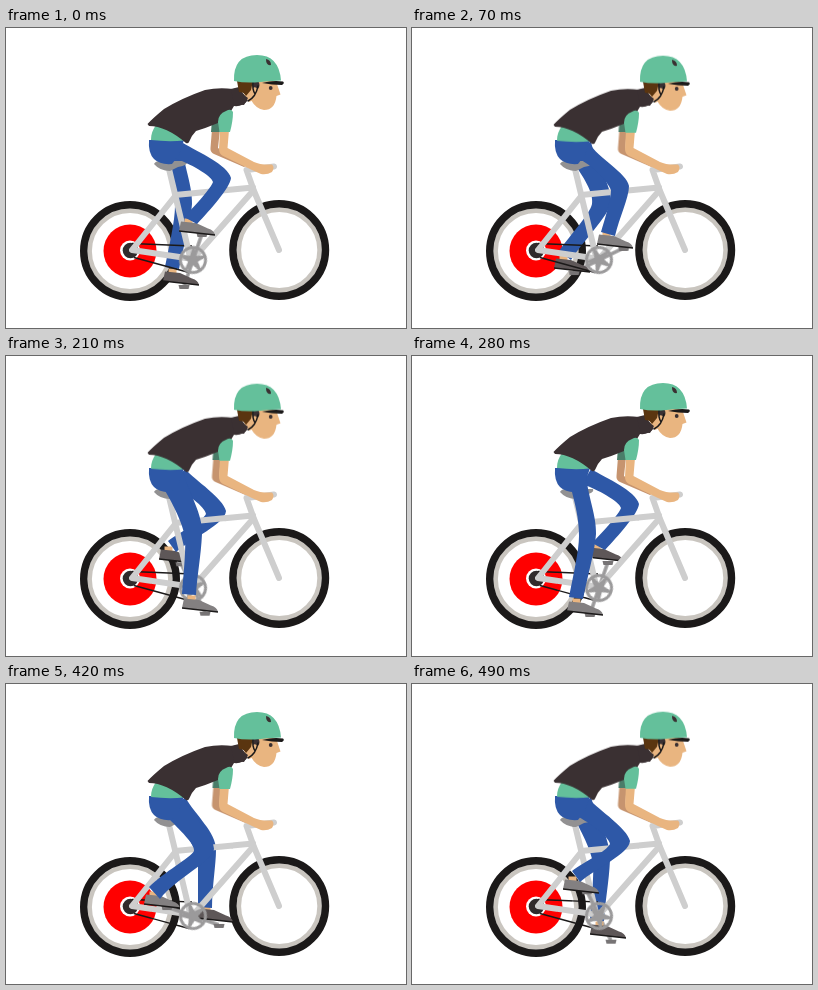
An HTML page without scripts that plays this animation: 400 px wide and 300 px high, repeating every 560 ms.

```html
<!DOCTYPE html>
<html lang="en">
<head>
<meta charset="utf-8">
<title>Cyclist</title>
<style>
html, body { margin: 0; width: 100%; height: 100%; overflow: hidden; background: #fff; }
svg { display: block; width: 100%; height: 100%; }

.thin { fill: none; stroke: #1b1919; stroke-width: 1.4; }
.tube { fill: none; stroke: #cecece; stroke-width: 6; stroke-linecap: round; stroke-linejoin: round; }
.metal { fill: none; stroke: #9b9a9b; }
.teal { fill: #64c09b; }
.skin { fill: #e9b580; }
.dark { fill: #3a3032; }
.jeans { fill: #2e58a7; }

/* eight held poses per turn of the crank */
.leg, .foot { animation: leg .56s step-end infinite; }
.foot { animation-name: foot; }
.crank { animation: turn .56s steps(8) infinite; }
.level { animation: unturn .56s steps(8) infinite; }
.far .leg, .far .foot { animation-delay: -.28s; }
.body { animation: bob .28s step-end infinite; }
.reach { animation: reach .28s step-end infinite; }

@keyframes turn { to { transform: rotate(360deg); } }
@keyframes unturn { to { transform: rotate(-360deg); } }
@keyframes bob {
  0% { transform: none; }
  25%, 75% { transform: translateY(.7px); }
  50% { transform: translateY(1px); }
}
@keyframes reach {
  0% { transform: none; }
  25%, 50%, 75% { transform: translateX(1.5px); }
}
@keyframes foot {
  0% { transform: translate(209px, 207px); }
  12.5% { transform: translate(221px, 220px); }
  25% { transform: translate(225px, 240px); }
  37.5% { transform: translate(212px, 256px); }
  50% { transform: translate(191px, 259px); }
  62.5% { transform: translate(176px, 246px); }
  75% { transform: translate(174px, 224px); }
  87.5% { transform: translate(187px, 209px); }
}
@keyframes leg {
  0% { d: path("M177 115C192 124 222 137 225 150C224 160 204 182 191 196L178 189C190 177 205 160 207 154C206 149 190 138 168 130Z"); }
  12.5% { d: path("M177 115C186 130 215 145 217 158C217 170 207 190 203 208L189 204C193 190 199 172 199 162C195 153 182 138 165 130Z"); }
  25% { d: path("M177 115C188 134 208 150 208 168C208 182 204 205 204 226L190 225C190 205 190 186 190 176C186 163 175 146 162 132Z"); }
  37.5% { d: path("M177 115C183 138 197 158 196 178C195 200 191 220 190 239L176 238C178 215 180 192 179 181C176 166 168 150 158 133Z"); }
  50% { d: path("M175 115C172 130 185 158 184 178C183 195 175 222 171 243L157 241C161 220 167 195 167 180C167 162 163 148 159 132Z"); }
  62.5% { d: path("M177 115C180 134 198 159 197 176C195 190 168 216 157 234L145 225C157 208 176 188 178 178C180 168 170 150 156 133Z"); }
  75% { d: path("M177 115C188 134 207 149 208 165C206 178 170 194 154 215L143 203C158 188 184 174 188 167C189 160 174 146 160 132Z"); }
  87.5% { d: path("M177 115C188 127 215 144 218 157C217 170 184 184 168 198L160 187C172 178 194 168 198 160C197 153 180 140 163 131Z"); }
}
</style>
</head>
<body>
<svg viewBox="0 0 400 300">
  <defs>
    <g id="wheel" fill="none">
      <circle r="40.400" stroke="#c9c5bf" stroke-width="4.600"/>
      <circle r="46.300" stroke="#1b1919" stroke-width="7.400"/>
    </g>
    <g id="shoe">
      <path class="skin" d="M-30.500-16.500h8v7h-8z"/>
      <path d="M-34-13.500L-36-4L0 0Q-1-5-7-6.500L-19-12Z"/>
      <path class="thin" d="M-36-4L0 0"/>
    </g>
    <path id="pedal" d="M-5.500-1h11l-1 4h-9z"/>
    <path id="spoke" d="M-4 0L-1.200-12H1.200L4 0Z" fill="#9b9a9b"/>
  </defs>

  <!-- wheels -->
  <use href="#wheel" x="124" y="223"/>
  <use href="#wheel" x="273.200" y="222"/>
  <circle cx="124" cy="223" r="26.500" fill="#f00"/>
  <circle cx="124" cy="222.500" r="10" fill="#fff"/>
  <circle cx="124.500" cy="222.500" r="7.800" fill="#302b2c"/>

  <!-- far leg -->
  <g transform="translate(187 232) rotate(109)">
    <g class="crank">
      <path class="metal" d="M0 0H27" stroke-width="3.500"/>
      <g transform="translate(27.500) rotate(-109)"><g class="level"><use href="#pedal" fill="#777475"/></g></g>
    </g>
  </g>
  <g class="far">
    <g transform="translate(2 -2)"><g class="foot"><use href="#shoe" fill="#5e5758"/></g></g>
    <g transform="translate(2 -2)"><path class="leg jeans"/></g>
  </g>

  <!-- frame -->
  <path class="thin" d="M126 215.500L186 218M128 229.500L183 244.500"/>
  <path class="tube" d="M163 141L184 229M169 167L247 159.500M246 164L187 231M170 167L126 222L187 231"/>
  <path class="tube" d="M268 138.500L240.500 142L248 163L273 222"/>
  <path d="M148 136Q150 132 160 133H181Q183 137 172 139L164 143Q154 143 148 136Z" fill="#929192"/>

  <!-- chainring and near crank -->
  <g transform="translate(187 232) rotate(-71)">
    <g class="crank">
      <circle class="metal" r="12.500" stroke-width="3"/>
      <use href="#spoke"/>
      <use href="#spoke" transform="rotate(72)"/>
      <use href="#spoke" transform="rotate(144)"/>
      <use href="#spoke" transform="rotate(216)"/>
      <use href="#spoke" transform="rotate(288)"/>
      <path class="metal" d="M0 0H27" stroke-width="3.500"/>
      <g transform="translate(27.500) rotate(71)"><g class="level"><use href="#pedal" fill="#777475"/></g></g>
    </g>
  </g>

  <!-- near leg -->
  <g class="foot"><use href="#shoe" fill="#838081"/></g>
  <path class="leg jeans"/>
  <path class="jeans" d="M143 112H178L173 127L166 136Q154 137 148 131Q142 125 143 112Z"/>

  <!-- arms -->
  <g class="reach">
    <path d="M206 101H214L212 120L222 127L241 137L238 139L208 126Q204 124 204.500 120Z" fill="#c6946f"/>
    <path d="M206 92L214 90V104H205Z" fill="#4a7d69"/>
  </g>
  <path class="skin" d="M214 102H223L221.500 120L248 134Q254 137 266 136.500Q269 139 266 144Q261 147 255 146L246 142L217 128Q213 126 213 121Z"/>

  <!-- torso and head -->
  <g class="body">
    <path class="teal" d="M151 96Q145 103 145 112Q162 114 178 112.500L186 100Z"/>
    <path class="dark" d="M141.500 96Q147 90 158 81Q176 70 199 62Q213 59 227 61L232 60L242 72Q237 79 228 78L225 83Q215 86 212 95Q200 100 190 103Q185 108 183 114Q182 116 180 115Q160 98 143 98Z"/>
    <path class="teal" d="M212 94Q212 86 220 83Q225 80 227 84Q227 93 224 104H213.500Z"/>
    <path class="skin" d="M238 58H252V70L243 74L238 66Z"/>
    <path class="dark" d="M225 61L233 59Q236 66 242 70L238 77L228 76Z"/>
    <path class="skin" d="M245 53H270L274.500 66.500L270.500 68Q269 82 258 82Q250 81 245 72Z"/>
    <path d="M231 53H247L245 62L240 68Q238 64 233 64Z" fill="#5a3510"/>
    <path class="dark" d="M246 53H252Q255 57 252 61Q249 58 247 60Z"/>
    <path class="thin" d="M247 54Q246 61 249 66M252 58Q250 69 242 73" stroke-linecap="round"/>
    <circle class="dark" cx="264.700" cy="60" r="1.900"/>
    <path d="M256 55Q267 52 277 53.500Q279 55 276 57Q266 57 256 55Z" fill="#1b1919"/>
    <path class="teal" d="M228 53Q227 27 251 27Q273 27 275 52.500Q262 53 249 54.500Q237 55 228 53Z"/>
    <path class="dark" d="M260 31Q265 32 265 37Q260 38 260 31Z"/>
  </g>
</svg>
</body>
</html>
```
